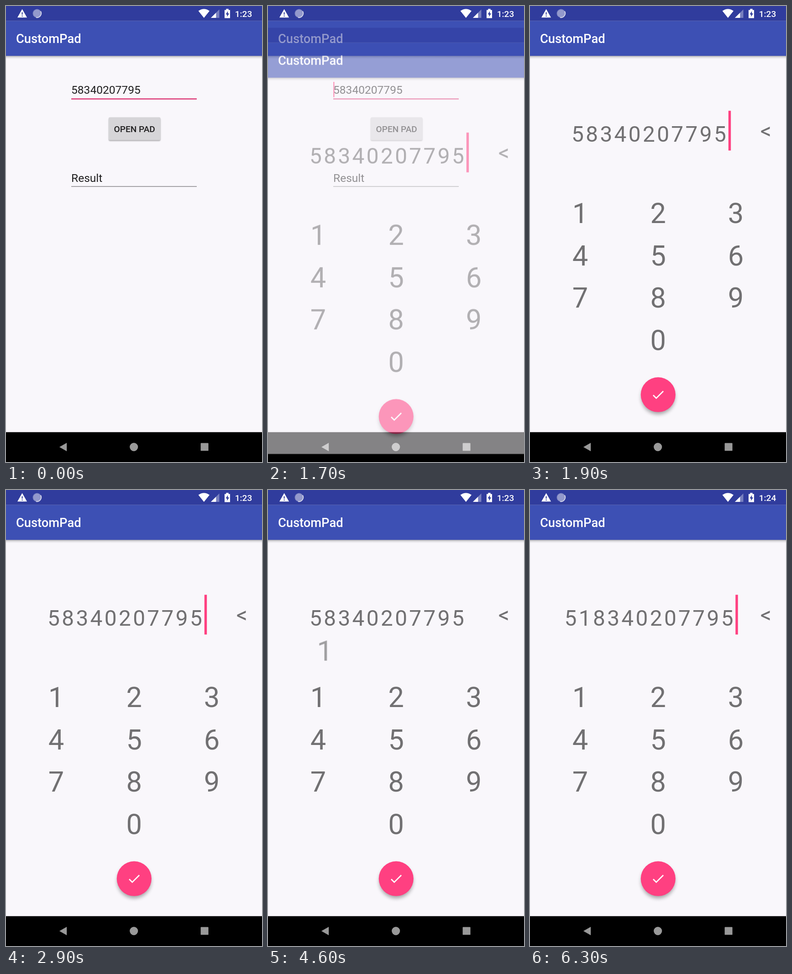
Write an HTML page that moves like this. It is 561 px wide and 998 px high and loops after 8000 ms.

```html
<!DOCTYPE html>
<html lang="en">
<head>
<meta charset="utf-8">
<title>CustomPad</title>
<style>
html, body { margin: 0; width: 100%; height: 100%; overflow: hidden; background: #000; }
svg { display: block; width: 100vw; height: 100vh; font-family: Roboto, sans-serif; }
.medium { font-weight: 500; }
.field { font-size: 24.56px; fill: #201f20; }
.keys { font-size: 61.4px; text-anchor: middle; }
.entry { font-size: 47.76px; letter-spacing: 4.35px; }
.soft { fill: #717072; }
.pink { fill: #ff4081; }

.anim { animation: 8s step-end infinite; }
.caret { animation-name: caret; }
.tap { animation-name: tap; transform-origin: 258px 268.5px; }
.pad { animation-name: pad; }
.press { animation-name: press; }
.ripple { animation-name: ripple; transform-origin: 109.5px 465px; }
.cursor { animation-name: cursor; }
.ghost { animation-name: ghost; }
.head { animation-name: head; }
.tail { animation-name: tail; }
.slot { animation-name: slot; transform-origin: 120.2px 270px; }
.before { animation-name: before; }
.after { animation-name: after; }
.end-cursor { animation-name: end-cursor; }
.early { animation-name: early; }
.late { animation-name: late; }

@keyframes caret { 0% { opacity: 0 } 6.25%, 100% { opacity: 1 } }
@keyframes tap {
  0% { opacity: 0 }
  10% { opacity: 1; transform: scale(.5) }
  11.25% { opacity: 1; transform: scale(1) }
  15%, 100% { opacity: 0 }
}
@keyframes pad {
  0% { opacity: 0 }
  21.25% { opacity: .53; transform: translateY(47.7px) }
  22.5% { opacity: 1; transform: translateY(8px) }
  23.75%, 100% { opacity: 1; transform: none }
}
@keyframes press { 0% { opacity: 0 } 47.5% { opacity: 1 } 50%, 100% { opacity: 0 } }
@keyframes ripple { 0% { transform: scale(1) } 48.75%, 100% { transform: scale(2.2) } }
@keyframes cursor { 0% { opacity: 1 } 50%, 100% { opacity: 0 } }
@keyframes ghost {
  0% { opacity: 0 }
  50% { opacity: 1; transform: translate(0, 16px) }
  53.75% { opacity: 1; transform: translate(2px, 8px) }
  55% { opacity: 1; transform: translate(6px, -25px) }
  56.25% { opacity: 1; transform: translate(11px, -65px) }
  57.5% { opacity: 1; transform: translate(14.5px, -101.5px) }
  58.75% { opacity: 1; transform: translate(15px, -125px) }
  60% { opacity: 1; transform: translate(14.5px, -143px) }
  61.25% { opacity: 1; transform: translate(13.5px, -156px) }
  62.5% { opacity: 1; transform: translate(13px, -165px) }
  63.75% { opacity: 1; transform: translate(12px, -170.5px) }
  77.5%, 100% { opacity: 0 }
}
@keyframes head {
  0% { transform: none }
  65% { transform: translateX(-4px) }
  66.25% { transform: translateX(-8.3px) }
  67.5% { transform: translateX(-10.4px) }
  68.75%, 100% { transform: translateX(-11px) }
}
@keyframes tail {
  0% { transform: none }
  65% { transform: translateX(4px) }
  66.25% { transform: translateX(8.3px) }
  67.5% { transform: translateX(10.4px) }
  68.75%, 100% { transform: translateX(11px) }
}
@keyframes slot {
  0% { opacity: 0 }
  65% { opacity: 1; transform: scaleX(.46) }
  66.25% { opacity: 1; transform: scaleX(.8) }
  67.5% { opacity: 1; transform: scaleX(.95) }
  68.75% { opacity: 1; transform: none }
  77.5%, 100% { opacity: 0 }
}
@keyframes before { 0% { opacity: 1 } 77.5%, 100% { opacity: 0 } }
@keyframes after { 0% { opacity: 0 } 77.5%, 100% { opacity: 1 } }
@keyframes end-cursor { 0% { opacity: 0 } 78.75%, 100% { opacity: 1 } }
@keyframes early { 0% { opacity: 1 } 65%, 100% { opacity: 0 } }
@keyframes late { 0% { opacity: 0 } 65%, 100% { opacity: 1 } }
</style>
</head>
<body>
<svg viewBox="0 0 561 998" preserveAspectRatio="none">
  <defs>
    <linearGradient id="fall" x2="0" y2="1">
      <stop stop-color="#000" stop-opacity=".32"/>
      <stop offset=".4" stop-color="#000" stop-opacity=".12"/>
      <stop offset="1" stop-color="#000" stop-opacity="0"/>
    </linearGradient>
    <filter id="blur" x="-30%" y="-30%" width="160%" height="160%"><feGaussianBlur stdDeviation="4.5"/></filter>
    <filter id="blur-small" x="-10%" y="-20%" width="120%" height="140%"><feGaussianBlur stdDeviation="1.3"/></filter>
    <clipPath id="button"><rect x="225" y="243.5" width="113.5" height="50" rx="2.7"/></clipPath>
    <g id="window">
      <rect width="561" height="998" fill="#f9f7fb"/>
      <rect y="109" width="561" height="7" fill="url(#fall)"/>
      <rect y="32.7" width="561" height="76.4" fill="#3d50b4"/>
      <rect width="561" height="32.7" fill="#303c9d"/>
      <text class="medium" x="22" y="81.3" font-size="27.3" fill="#fff">CustomPad</text>
      <rect y="932.7" width="561" height="65.3"/>
    </g>
  </defs>

  <use href="#window"/>
  <g class="field">
    <text x="143" y="192.3">58340207795</text>
    <text x="143" y="384.6">Result</text>
  </g>
  <rect x="143" y="202" width="275" height="2.7" fill="#df4880"/>
  <rect x="143" y="394.3" width="275" height="1.4" fill="#828083"/>
  <rect class="anim caret pink" x="143" y="166" width="2.6" height="33.5"/>
  <rect x="225" y="245.5" width="113.5" height="50" rx="3" opacity=".3" filter="url(#blur-small)"/>
  <g clip-path="url(#button)">
    <rect x="225" y="243" width="114" height="51" fill="#d6d5d8"/>
    <circle class="anim tap" cx="258" cy="268.5" r="29" fill-opacity=".09"/>
  </g>
  <text class="medium" x="281.7" y="275.8" font-size="19.1" text-anchor="middle" fill="#201f20">OPEN PAD</text>

  <g class="anim pad">
    <use href="#window"/>
    <g class="anim press">
      <circle cx="110.5" cy="450" r="72.5" fill-opacity=".022"/>
      <circle class="anim ripple" cx="109.5" cy="465" r="10.8" fill-opacity=".08"/>
    </g>
    <rect class="anim slot pink" x="106.9" y="229.3" width="26.6" height="81.2"/>
    <g class="entry soft">
      <g class="anim before">
        <text class="anim head" x="91.1" y="297.3">5</text>
        <text class="anim tail" x="122.25" y="297.3">8340207795</text>
      </g>
      <text class="anim after" x="75.6" y="297.3">518340207795</text>
    </g>
    <rect class="anim cursor pink" x="434.8" y="229.3" width="5.4" height="87"/>
    <rect class="anim end-cursor pink" x="450.3" y="229.3" width="5.4" height="87"/>
    <text class="soft" x="517" y="290" font-size="47.76" text-anchor="middle">&lt;</text>
    <g class="keys soft">
      <text x="110" y="475">1</text><text x="280.7" y="475">2</text><text x="451" y="475">3</text>
      <text x="110" y="567.5">4</text><text x="280.7" y="567.5">5</text><text x="451" y="567.5">6</text>
      <text x="110" y="660">7</text><text x="280.7" y="660">8</text><text x="451" y="660">9</text>
      <text x="280.7" y="752.5">0</text>
    </g>
    <text class="keys anim ghost" x="110" y="475" fill-opacity=".36">1</text>
    <circle cx="280.8" cy="856.5" r="37" opacity=".34" filter="url(#blur)"/>
    <circle class="pink" cx="280.8" cy="850.7" r="38.1"/>
    <path transform="translate(264.4 834.4) scale(1.364)" fill="#fff" d="M9 16.17 4.83 12l-1.42 1.41L9 19 21 7l-1.41-1.41z"/>
  </g>

  <g fill="#fff">
    <path fill-rule="evenodd" d="M35.5 6.8 46 25.3H25zM34.5 13.5v5.5h2v-5.5zM34.5 20.8v2.2h2v-2.2z"/>
    <circle cx="68" cy="16.2" r="8.6" fill-opacity=".48"/>
    <circle cx="68" cy="16.2" r="9" fill="none" stroke="#fff" stroke-opacity=".5" stroke-width="1.2" stroke-dasharray="1.4 1.4"/>
    <path d="M76 11.5A9.2 9.2 0 0 1 66 25" fill="none" stroke="#fff" stroke-opacity=".75" stroke-width="1.8"/>
    <path d="M433.8 26 421.6 10.8Q433.8 2.2 446 10.8z"/>
    <path d="M467.5 7.5V26H449z" fill-opacity=".35"/>
    <path d="M460.3 14.7V26H449z"/>
    <path fill-rule="evenodd" d="M482.3 6.3h5.4v2.4h3.3v17.8h-12V8.7h3.3zM486.2 11l-4.7 7.4h2.9v5.4l4.7-7.5h-2.9z"/>
    <g class="medium" font-size="19.1">
      <text class="anim early" x="501.7" y="23.6">1:23</text>
      <text class="anim late" x="501.7" y="23.6">1:24</text>
    </g>
    <g fill-opacity=".6">
      <path d="M133.2 956v18.4L117 965.2z"/>
      <circle cx="280.2" cy="965.1" r="9.1"/>
      <rect x="426.6" y="956.6" width="17" height="17" rx="1.2"/>
    </g>
  </g>
</svg>
</body>
</html>
```
